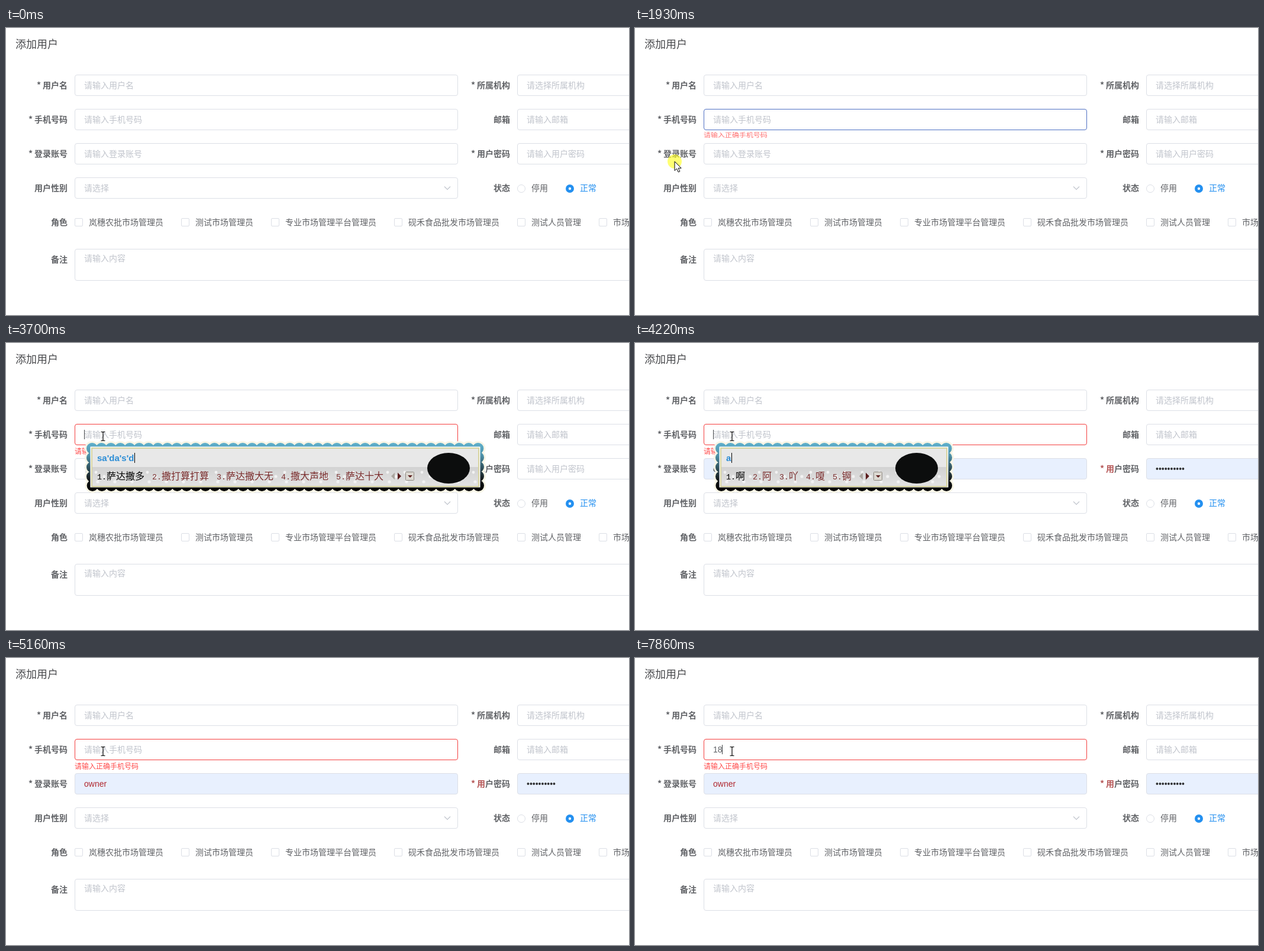
Animation of 1053x486 px, one loop 8 s. Source, as an HTML page:

```html
<!DOCTYPE html>
<html lang="zh-CN">
<head>
<meta charset="utf-8">
<title>添加用户</title>
<style>
html, body { margin: 0; width: 100%; height: 100%; overflow: hidden; background: #fff; }
svg { display: block; width: 100vw; height: 100vh; }
text { font-family: "Noto Sans CJK SC", "Noto Sans CJK", "Liberation Sans", sans-serif; white-space: pre; }
.latin { font-family: "Liberation Sans", Arial, sans-serif; }
.mono { font-family: "Liberation Mono", monospace; }
</style>
</head>
<body>
<svg id="stage" viewBox="0 0 1053 486">
  <defs>
    <linearGradient id="lace" gradientUnits="userSpaceOnUse" x1="0" y1="169" x2="0" y2="251">
      <stop offset="0" stop-color="#5fb0cc"/>
      <stop offset=".25" stop-color="#4f93ab"/>
      <stop offset=".75" stop-color="#151a1c"/>
      <stop offset="1" stop-color="#000"/>
    </linearGradient>
    <linearGradient id="shade" x1="0" y1="0" x2="0" y2="1">
      <stop offset="0" stop-color="#d2d2d2"/>
      <stop offset="1" stop-color="#e2e2e2"/>
    </linearGradient>
    <pattern id="dots" patternUnits="userSpaceOnUse" x="146" y="211" width="29" height="32">
      <circle cx="6" cy="8" r="2.4" fill="#f2f2f2"/>
      <circle cx="20" cy="15" r="2.6" fill="#f2f2f2"/>
      <circle cx="9" cy="24" r="2.6" fill="#f2f2f2"/>
    </pattern>
  </defs>
</svg>
<script>
const LOOP = 8000;
const INK = '#606266', HINT = '#c0c4cc', LINE = '#dcdfe6', BLUE = '#2490f0', RED = '#ff4949';
const stage = document.getElementById('stage');

function el(tag, attrs, parent = stage) {
  const node = document.createElementNS('http://www.w3.org/2000/svg', tag);
  for (const key in attrs) node.setAttribute(key, attrs[key]);
  parent.appendChild(node);
  return node;
}
function set(node, attrs) {
  for (const key in attrs) node.setAttribute(key, attrs[key]);
}
function show(node, on) {
  node.setAttribute('visibility', on ? 'visible' : 'hidden');
}
// Text centred on height cy
function write(x, cy, str, size = 14, fill = INK, more = {}, parent = stage) {
  const node = el('text', { x, y: cy + size * 0.375, 'font-size': size, fill, ...more }, parent);
  node.textContent = str;
  return node;
}
function label(right, cy, str, required) {
  const bold = { 'font-weight': 700 }, x = right - str.length * 14;
  if (required) write(x - 10, cy, '*', 14, INK, bold);
  write(x, cy, str, 14, INK, bold);
}
function field(x, y, w, hint, h = 36, hintY = y + 18) {
  const box = el('rect', { x: x + .5, y: y + .5, width: w - 1, height: h - 1, rx: 3.5, fill: '#fff', stroke: LINE });
  return { box, hint: write(x + 16, hintY, hint, 14, HINT) };
}

// Form
write(16, 27, '添加用户', 18, '#48494c');
label(104, 97, '用户名', true);
label(104, 155, '手机号码', true);
label(104, 213, '登录账号', true);
label(104, 271, '用户性别');
label(104, 329, '角色');
label(104, 392, '备注');
label(852, 97, '所属机构', true);
label(852, 155, '邮箱');
label(852, 213, '户密码');
label(852, 271, '状态');
const tinted = el('g', { 'font-weight': 700 });
write(786, 213, '*', 14, 'inherit', {}, tinted);
write(796, 213, '用', 14, 'inherit', {}, tinted);

field(116, 79, 648, '请输入用户名');
const phone = field(116, 137, 648, '请输入手机号码');
const login = field(116, 195, 648, '请输入登录账号');
const gender = field(116, 253, 648, '请选择');
field(864, 79, 648, '请选择所属机构');
field(864, 137, 648, '请输入邮箱');
const pwd = field(864, 195, 648, '请输入用户密码');
field(116, 374, 1400, '请输入内容', 54, 390);
el('path', { d: 'M741 268.5l5 5 5-5', fill: 'none', stroke: HINT, 'stroke-width': 1.2 });

el('circle', { cx: 871, cy: 272, r: 6.5, fill: '#fff', stroke: LINE });
write(888, 271, '停用');
el('circle', { cx: 953, cy: 272, r: 7, fill: BLUE });
el('circle', { cx: 953, cy: 272, r: 2.2, fill: '#fff' });
write(970, 271, '正常', 14, BLUE);

[[116, '岚穗农批市场管理员'], [296, '测试市场管理员'], [448, '专业市场管理平台管理员'],
 [656, '砚禾食品批发市场管理员'], [864, '测试人员管理'], [1002, '市场管理']].forEach(([x, name]) => {
  el('rect', { x: x + .5, y: 322.5, width: 13, height: 13, rx: 1.5, fill: '#fff', stroke: LINE });
  write(x + 24, 329, name);
});

const account = write(132, 213, 'owner', 14, INK, { class: 'latin' });
const secret = write(880, 213, '••••••••••', 14, '#303133', { class: 'latin' });
const digits = write(132, 155, '', 14, INK, { class: 'latin' });
const caret = el('rect', { y: 147, width: 1, height: 16, fill: '#404246' });
const errorBox = el('g', {});
write(116, 183, '请输入正确手机号码', 12, RED, {}, errorBox);

// Input method window
const popup = el('g', {});
function drawPopup(typed, words) {
  popup.replaceChildren();
  if (!typed) return;
  const items = words.split(' ');
  const widthOf = s => [...s].reduce((w, c) => w + (c < '\u0100' ? 8 : 16), 16);
  const end = items.reduce((x, s) => x + widthOf(s) + 13, 154);
  const right = end + 157, w = right - 155;
  const frame = { x: 145.5, y: 178.5, width: w, height: 63 };
  const dash = Math.round((w + 63) * 2 / 16) * 16;
  const bumps = { ...frame, fill: 'none', pathLength: dash, 'stroke-dasharray': '0 16', 'stroke-linecap': 'round' };
  el('rect', { ...bumps, stroke: '#f8f5e6', 'stroke-width': 25 }, popup);
  el('rect', { ...bumps, stroke: 'url(#lace)', 'stroke-width': 19 }, popup);
  el('rect', { ...frame, fill: 'none', stroke: 'url(#lace)', 'stroke-width': 10 }, popup);
  el('rect', { x: 142.5, y: 175.5, width: w + 6, height: 69, fill: '#fff' }, popup);
  el('rect', { x: 145, y: 178, width: w + 1, height: 65, fill: '#e8e8e8', stroke: '#d8d4a0', 'stroke-width': 2 }, popup);
  const lower = { x: 146, y: 210, width: w - 1, height: 32 };
  el('rect', { ...lower, fill: 'url(#shade)' }, popup);
  el('rect', { ...lower, fill: 'url(#dots)' }, popup);
  el('ellipse', { cx: right - 60, cy: 212, rx: 36, ry: 26, fill: '#0c0d0d' }, popup);

  const line = write(154, 194.4, typed, 15, '#2b8dd6', { class: 'latin', 'font-weight': 700 }, popup);
  el('rect', { x: Math.round(155 + line.getComputedTextLength()), y: 186, width: 1, height: 17, fill: '#000' }, popup);

  let x = 154;
  items.forEach((s, i) => {
    const ink = i ? '#7a2c2c' : '#000';
    const wide = s[0] > '\u0100';
    write(x, 226, `${i + 1}.${wide ? '' : s}`, 13.33, ink, { class: 'mono' }, popup);
    if (wide) write(x + 16, 225, s, 16, ink, { 'font-weight': 300 }, popup);
    x += widthOf(s) + 13;
  });
  el('path', { d: `M${end + 6} 219.5v12l-6-6z`, fill: '#aaa59f' }, popup);
  el('path', { d: `M${end + 11} 219.5v12l6-6z`, fill: '#5c1d1d' }, popup);
  el('rect', { x: end + 24.5, y: 218.5, width: 14, height: 14, rx: 1, fill: '#dcd9d2', stroke: '#8d8880' }, popup);
  el('path', { d: `M${end + 28} 224h8l-4 4z`, fill: '#5c1d1d' }, popup);
}

// Mouse
const halo = el('circle', { r: 12, fill: '#ffff28', opacity: .65 });
const arrow = el('path', { d: 'M0 0v15.5l3.6-3.3 2.6 5.8 2.6-1.1-2.6-5.6h4.9z', fill: '#fff', stroke: '#000' });
const beam = el('path', { d: 'M1.5-6.5h2.5l1 1 1-1h2.5M5-5.5v13M1.5 8.5h2.5l1-1 1 1h2.5', fill: 'none', stroke: '#000', 'stroke-width': 1.2 });

const path = [[200, 395, 470], [960, 263, 174], [1170, 252, 155], [1440, 252, 155],
  [1790, 67, 226], [2000, 67, 226], [2550, 159, 157]];
const clicks = [[1170, 1370], [1860, 2000], [2680, 2820]];
const caretOn = [[1240, 1830], [2550, 3090], [3350, 5160], [5430, 6510], [7040, 7590], [7660, LOOP]];
const typing = [[0, ''], [5430, '1'], [5710, '12'], [5980, '123'], [6710, '12'], [6840, '1'],
  [7040, ''], [7660, '1'], [7860, '18']];
const composing = [[0, ''],
  [3350, 's', '是 上 时 说 色'],
  [3500, "sa'd", '撒旦 萨达 撒地 洒的 撒到'],
  [3570, "sa'da's", '萨达姆 撒打算 撒大师 萨达萨 撒大声'],
  [3700, "sa'da's'd", '萨达撒多 撒打算打算 萨达撒大无 撒大声地 萨达十大'],
  [3830, ''],
  [4220, 'a', '啊 阿 吖 嗄 锕'],
  [4290, 'as', 'as 阿萨 阿斯 暗示 碍事'],
  [4360, 'asd', 'asd 阿斯达 啊实打 爱上的 按时到'],
  [4570, 'as', 'as 阿萨 阿斯 暗示 碍事'],
  [4630, '']];

const latest = (list, t) => list.filter(step => step[0] <= t).pop();
const within = (spans, t) => spans.some(([a, b]) => t >= a && t < b);
const clamp = v => Math.max(0, Math.min(1, v));

function mouseAt(t) {
  const q = 200 + Math.floor((t - 200) / 69 + 1e-6) * 69;
  const i = path.findIndex(p => p[0] > q);
  if (i < 1) return path[path.length - 1].slice(1);
  const [t0, x0, y0] = path[i - 1], [t1, x1, y1] = path[i];
  const u = (q - t0) / (t1 - t0), e = u * u * (3 - 2 * u);
  return [x0 + (x1 - x0) * e, y0 + (y1 - y0) * e];
}
function mix(a, b, k) {
  return `rgb(${a.map((v, i) => Math.round(v + (b[i] - v) * k))})`;
}

let shown = null;
function render(t) {
  const [mx, my] = mouseAt(t);
  const moving = t >= 200;
  const over = y => moving && mx >= 116 && mx <= 764 && my >= y && my < y + 36;
  const spot = { transform: `translate(${Math.round(mx)} ${Math.round(my)})` };
  const text = over(137) || over(195);
  [halo, arrow, beam].forEach(node => set(node, spot));
  show(halo, within(clicks, t));
  show(arrow, moving && !text);
  show(beam, text);

  let edge = over(137) ? HINT : LINE;
  if (t >= 1830) edge = mix([78, 112, 196], [244, 62, 62], clamp((t - 1930) / 120));
  else if (t >= 1240) edge = '#409eff';
  set(phone.box, { stroke: edge });
  set(login.box, { stroke: over(195) ? HINT : LINE });
  set(gender.box, { stroke: over(253) ? HINT : LINE });

  const grow = clamp((t - 1830) / 125);
  set(errorBox, { opacity: grow, transform: `translate(0 ${173 * (1 - grow)}) scale(1 ${grow})` });

  const filled = t >= 3890;
  [login, pwd].forEach(f => {
    set(f.box, { fill: filled ? '#e8f0fe' : '#fff' });
    show(f.hint, !filled);
  });
  show(account, filled);
  show(secret, filled);
  set(account, { fill: t >= 4630 ? '#b0282f' : '#303133' });
  set(tinted, { fill: filled ? '#b65858' : INK });

  const value = latest(typing, t)[1];
  digits.textContent = value;
  show(phone.hint, !value);
  set(caret, { x: Math.floor(132 + 7.79 * value.length) });
  show(caret, within(caretOn, t));

  const step = latest(composing, t);
  if (step !== shown) {
    shown = step;
    drawPopup(step[1], step[2]);
  }
}
function tick() {
  render(performance.now() % LOOP);
  requestAnimationFrame(tick);
}
tick();
</script>
</body>
</html>
```
